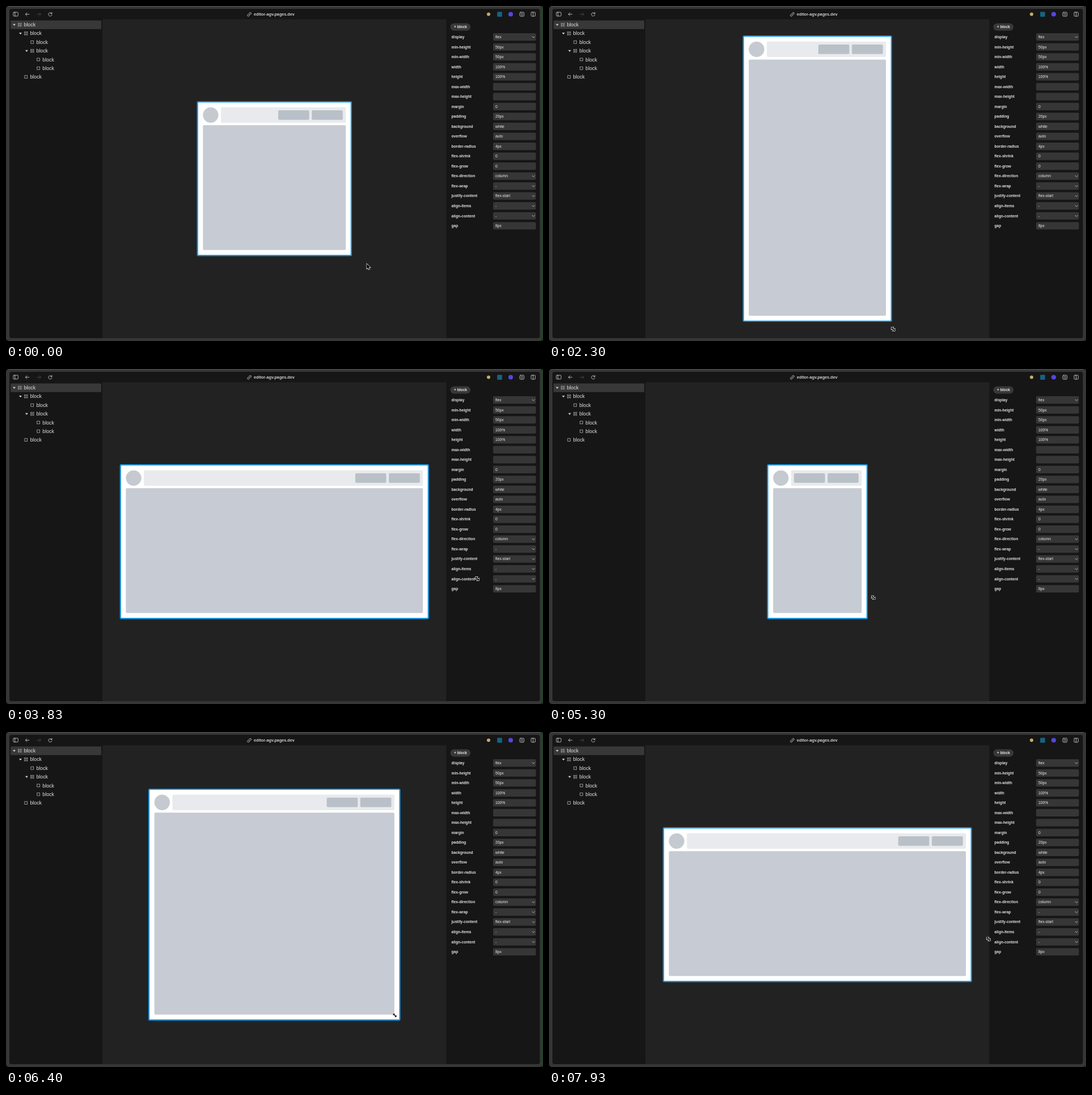
An HTML page for the animation above (8 s loop, 947 px wide and 591 px high).

```html
<!DOCTYPE html>
<html lang="en">
<head>
<meta charset="utf-8">
<title>Block editor</title>
<style>
  html, body { margin: 0; width: 100%; height: 100%; overflow: hidden; background: #000; }
  svg { display: block; width: 947px; height: 591px; font: 6.65px "Liberation Sans", Arial, sans-serif; }
  .line { fill: none; stroke: #c6c6c6; stroke-width: .9; stroke-linecap: round; stroke-linejoin: round; }
  .pointer { fill: #000; stroke: #fff; stroke-width: 1.3; paint-order: stroke; }
</style>
</head>
<body>
<svg viewBox="0 0 947 591">
  <rect width="947" height="591" rx="5" fill="#363636"/>
  <path d="M4 .5H943" stroke="#555"/>
  <rect x="6" y="5" width="935.5" height="581" rx="4" fill="#161616"/>
  <path d="M170 23.5H776.5V586H170Z" fill="#222"/>
  <path d="M946.5 0V591" stroke="#16491a"/>

  <g class="line">
    <rect x="12.9" y="11" width="8.4" height="6.8" rx="1.2"/>
    <path d="M15.8 11v6.8M37 11.7l-2.8 2.8 2.8 2.8M34.4 14.5h6.4"/>
    <path d="M58.600 11.700l2.800 2.800-2.800 2.800M61 14.500h-6.400" stroke="#484848"/>
    <path d="M80.700 13.300a3.100 3.100 0 1 0 .3 2.200M81 11.300v2.200h-2.200"/>
    <g transform="rotate(-45 429 14.800)">
      <path d="M428.300 13.200h-1.700a1.600 1.600 0 0 0 0 3.200h1.700M429.700 13.200h1.700a1.600 1.600 0 0 1 0 3.200h-1.700M427.600 14.800h2.800"/>
    </g>
    <rect x="906" y="11" width="7.600" height="7.200" rx="1.600"/>
    <path d="M908 13.300h3.600M908 15.900h3.600"/>
    <rect x="926" y="11" width="7.400" height="7" rx="1.200"/>
    <path d="M929.700 11v7"/>
  </g>
  <circle cx="851" cy="14.500" r="3" fill="#c6ac68"/>
  <rect x="866.200" y="10.300" width="8.600" height="8.600" rx="1" fill="#17627f"/>
  <circle cx="890" cy="14.500" r="4.100" fill="#5546dd"/>
  <text x="437" y="17.100" font-size="7.240" font-weight="bold" fill="#cfcfcf">editor-agv.pages.dev</text>

  <g id="panels"></g>
  <g id="design"></g>
  <path id="arrow" class="pointer" d="M0 0V8.600L2 6.800 3.300 9.800 4.700 9.200 3.400 6.300H6.100Z"/>
  <path id="resize" class="pointer" d="M-3-3H.4L-.8-1.800 1.800.8 3-.4V3H-.4L.8 1.800-1.800-.8-3 .4Z"/>
</svg>
<script>
const $ = id => document.getElementById(id);
const clamp = (v, lo, hi) => Math.min(hi, Math.max(lo, v));

function add(parent, tag, attrs, text = '') {
  const el = document.createElementNS('http://www.w3.org/2000/svg', tag);
  for (const key in attrs) el.setAttribute(key, attrs[key]);
  el.textContent = text;
  parent.append(el);
  return el;
}
const panels = $('panels'), design = $('design');
const box = (x, y, width, height, rx, fill, parent = panels) =>
  add(parent, 'rect', { x, y, width, height, rx, fill });

// Layer tree: depth and whether the block has children
box(8, 25.5, 160, 15.3, 1.5, '#383838');
const tree = [[0, 1], [1, 1], [2, 0], [2, 1], [3, 0], [3, 0], [1, 0]];
tree.forEach(([depth, open], i) => {
  const x = 31.5 + depth * 10.95, y = 33 + i * 15.35;
  add(panels, 'text', { x, y: y + 3.1, 'font-size': 8.8, fill: '#e4e4e4' }, 'block');
  if (open) {
    add(panels, 'path', { d: `M${x - 19.5} ${y - 1.3}h5l-2.500 3.200z`, fill: '#ccc' });
    for (const dx of [-10, -6.4]) for (const dy of [-2.8, .8])
      add(panels, 'rect', { x: x + dx, y: y + dy, width: 2, height: 2, fill: 'none', stroke: '#a8a8a8', 'stroke-width': .7 });
  } else {
    add(panels, 'rect', { x: x - 9.6, y: y - 2.4, width: 4.8, height: 4.8, fill: 'none', stroke: '#b4b4b4', 'stroke-width': .8 });
  }
});

// Properties; a leading "v" marks a dropdown
box(783.5, 30.5, 35.7, 13, 6.5, '#383838');
add(panels, 'text', { x: 790, y: 39.4, 'font-weight': 'bold', fill: '#e8e8e8' }, '+ block');
const properties = `display:v flex|min-height:50px|min-width:50px|width:100%|height:100%|max-width:|max-height:|margin:0
|padding:20px|background:white|overflow:auto|border-radius:4px|flex-shrink:0|flex-grow:0|flex-direction:v column
|flex-wrap:v -|justify-content:v flex-start|align-items:v -|align-content:v -|gap:8px`;
properties.split('|').forEach((row, i) => {
  const [name, value] = row.trim().split(':'), y = 54.7 + i * 17.53;
  add(panels, 'text', { x: 785.5, y: y + 2.3, 'font-weight': 'bold', fill: '#e2e2e2' }, name);
  box(859, y - 6.6, 75.5, 13.2, 2, '#363636');
  add(panels, 'text', { x: 863, y: y + 2.3, 'font-size': 6.8, fill: '#eee' }, value.replace('v ', ''));
  if (value.startsWith('v ')) add(panels, 'path', { class: 'line', d: `M928 ${y - .9}l2.200 2.200 2.200-2.200` });
});

const part = (rx, fill) => box(0, 0, 0, 0, rx, fill, design);
const border = part(2.5, '#1c97e0'), page = part(1, '#fff'), avatar = part(13.7, '#c5cad1'),
  header = part(2, '#e8eaed'), body = part(2, '#c7cbd3'),
  buttons = [part(2, '#bac0c7'), part(2, '#bac0c7')];

function place(el, x, y, width, height) {
  for (const [key, v] of Object.entries({ x, y, width, height })) el.setAttribute(key, v);
}

function layout(halfW, halfH) {
  const inset = 10.7, size = 27.3, cx = 473.3, cy = 304.6;
  const left = cx - halfW, top = cy - halfH, w = 2 * halfW, h = 2 * halfH;
  const x = left + inset, y = top + inset, right = cx + halfW - inset;
  place(border, left, top, w, h);
  place(page, left + 2.2, top + 2.2, w - 4.4, h - 4.4);
  place(avatar, x, y, size, size);
  place(header, x + 31.8, y, right - x - 31.8, size);
  place(body, x, y + 31.6, right - x, h - 2 * inset - 31.6);
  buttons.forEach((b, i) => place(b, right - 119.3 + i * 59.2, y + 5.2, 54.7, 16.8));
}

// Pointer moves: start, end, target x, target y
const home = [636.3, 455];
const moves = [
  [300, 900, 609.3, 440.5], [1370, 2100, 603, 570], [2220, 3100, 790, 571], [3130, 3830, 831, 370],
  [4000, 4830, 534, 370.5], [5080, 5820, 719, 531.5], [6180, 7000, 521, 343.3], [7250, 7930, 775, 365.3]
];
function pointerAt(t) {
  let [x, y] = home;
  for (const [start, end, toX, toY] of moves) {
    const p = (1 - Math.cos(Math.PI * clamp((t - start) / (end - start), 0, 1))) / 2;
    x += (toX - x) * p;
    y += (toY - y) * p;
  }
  return [x, y];
}

const lag = 35;
function draw(now) {
  const t = now % 8000, [x, y] = pointerAt(t);
  // The box follows the handle once it has been grabbed
  const [gripX, gripY] = pointerAt(Math.max(t - lag, 1000));
  layout(clamp(gripX - 472.6, 87.2, 272.6), clamp(gripY - 303.9, 136.6, 252.5));
  const grabbed = t > 820;
  $('arrow').style.display = grabbed ? 'none' : '';
  $('resize').style.display = grabbed ? '' : 'none';
  $(grabbed ? 'resize' : 'arrow').setAttribute('transform', `translate(${x} ${y})`);
  requestAnimationFrame(draw);
}
draw(0);
</script>
</body>
</html>
```
